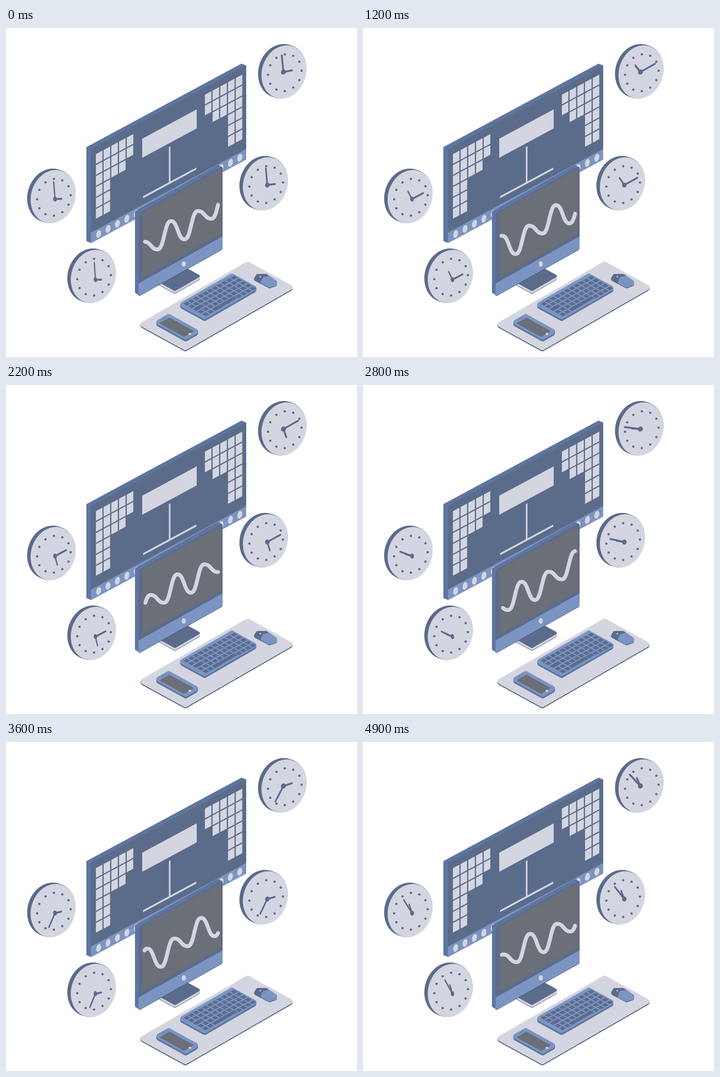
Recreate the animation shown at these times as an HTML page with a canvas. Size 773 by 725 pixels, loop 5 s.

```html
<!DOCTYPE html>
<html lang="en">
<head>
<meta charset="utf-8">
<title>Isometric desk</title>
<style>
html, body { margin: 0; width: 100%; height: 100%; overflow: hidden; background: #fff; }
canvas { display: block; }
</style>
</head>
<body>
<canvas id="stage" width="773" height="725"></canvas>
<script>
const LIGHT = '#d3d5e0', DARK = '#5b6c8b', EDGE = '#5f75a0', BLUE = '#7b94c2';
const GREY = '#6a6f78', NAVY = '#414f6e';
const W = 773, H = 725, LOOP = 5000, STEP = 100;
const TURN = Math.PI * 2;

const view = document.getElementById('stage').getContext('2d');
const scene = document.createElement('canvas');
scene.width = W;
scene.height = H;
let g = scene.getContext('2d');

// Rectangles in the two isometric planes, as corner lists
const quad = (x, y, ux, uy, vx, vy) =>
  [[x, y], [x + ux, y + uy], [x + ux + vx, y + uy + vy], [x + vx, y + vy]];
const wall = (x, y, w, h, slope = .539) => quad(x, y, w, -w * slope, 0, h);
const floor = (x, y, a, b) => quad(x, y, a, -a * .577, b, b * .55);
const move = (pts, dx, dy) => pts.map(([x, y]) => [x + dx, y + dy]);

function poly(color, pts, r = 0) {
  const [a, b] = [pts[pts.length - 1], pts[0]];
  g.beginPath();
  g.moveTo((a[0] + b[0]) / 2, (a[1] + b[1]) / 2);
  pts.forEach((p, i) => g.arcTo(...p, ...pts[(i + 1) % pts.length], r));
  g.closePath();
  g.fillStyle = color;
  g.fill();
}

// A face with its side swept along (dx, dy)
function solid(top, side, face, dx, dy, r = 0) {
  const n = Math.ceil(Math.max(Math.abs(dx), Math.abs(dy)));
  for (let i = n; i > 0; i--) poly(side, move(face, dx * i / n, dy * i / n), r);
  poly(top, face, r);
}

// An ellipse sheared upwards to the right
function disc(color, x, y, rx, ry = rx, lift = 0) {
  g.save();
  g.transform(rx, -lift, 0, ry, x, y);
  g.beginPath();
  g.arc(0, 0, 1, 0, TURN);
  g.restore();
  g.fillStyle = color;
  g.fill();
}

function tiles(x, y, rowsIn) {
  for (let c = 0; c < 5; c++) {
    for (let r = 0; r < rowsIn(c); r++) {
      poly(LIGHT, wall(x + c * 17, y - c * 9.15 + r * 24.2, 14.3, 21.3));
    }
  }
}

function wideMonitor() {
  solid(DARK, EDGE, wall(187, 266.5, 342, 207.5), -10, -4);
  poly(BLUE, wall(187, 451, 342, 23));
  for (let i = 0; i < 16; i++) {
    if (i < 5 || i > 12) disc(LIGHT, 204 + i * 20.73, 454 - i * 11.2, 5.5, 8.2, 2.5);
  }
  tiles(198, 278, c => c < 2 ? 6 : c < 4 ? 3 : 2);
  tiles(438, 147, c => c > 2 ? 6 : c > 0 ? 3 : 2);
  poly(LIGHT, wall(300, 244, 120, 42));
  poly(LIGHT, wall(358.7, 262.5, 3.5, 80));
  poly(LIGHT, wall(302, 370.5, 117, 4.5));
}

function deskMonitor() {
  const slope = .562;
  const foot = floor(331, 557.5, 58, 41);
  poly(NAVY, move(foot, 0, 6), 3);
  solid(DARK, LIGHT, foot, 0, 5, 3);
  const front = wall(292, 408, 185, 183, slope);
  poly(NAVY, move(front, -1, 1.5), 3);
  solid(DARK, EDGE, front, -8, -4, 3);
  poly(GREY, wall(300, 407, 174, 143, .555));
  poly(BLUE, wall(292, 563, 185, 28, slope));
  disc(LIGHT, 391.5, 520, 4.5, 6);
}

function keyboard() {
  solid(BLUE, EDGE, floor(377.5, 609.5, 120, 60), 0, 4, 6);
  const pitch = 10.4, size = 7.6;
  const key = (row, col, span = 1) => poly(DARK, floor(
    390.5 + (row + col) * pitch,
    607.7 + (row * .56 - col * .55) * pitch,
    size + (span - 1) * pitch, size));
  for (let row = 0; row < 5; row++) {
    for (let col = 0; col < 11; col++) {
      const span = row === 4 && col === 2 ? 5 : row === 2 && col === 0 ? 2 : 1;
      key(row, col, span);
      col += span - 1;
    }
  }
}

function phone() {
  solid(BLUE, EDGE, floor(325, 648.5, 33, 71), 0, 4, 6);
  poly(GREY, floor(338, 651, 22, 54), 1);
  disc(LIGHT, 405, 674, 2.7, 2.5);
  for (let i = 0; i < 3; i++) disc(DARK, 345 + i * 3.5, 642 - i * 2, 1.2, .9);
}

function mouse() {
  poly(DARK, [[544, 555], [552, 542], [574, 542], [597, 558], [597, 568], [580, 574]], 5);
  poly(BLUE, [[560, 562], [566, 549], [580, 546], [597, 558], [597, 567], [579, 572]], 4);
  disc(LIGHT, 560, 548, 1.8, 1.6);
}

// Dial centre and the offset of its hub
const clocks = [
  { x: 614, y: 98.5, dx: -3, dy: -1.5 },
  { x: 105.5, y: 373, dx: 2.5, dy: 4 },
  { x: 573, y: 345, dx: 2.5, dy: 1 },
  { x: 194, y: 549, dx: 3, dy: 5.5 }
];

function dial({ x, y }) {
  for (let i = 0; i <= 6; i++) disc(DARK, x - 8.7 + i, y - 4.2 + i * .35, 50.3, 58.6, 7);
  disc(LIGHT, x - 1.8, y - 1.6, 49.5, 58.2, 7);
  for (let i = 0; i < 12; i++) {
    const a = i * TURN / 12, c = Math.cos(a), s = Math.sin(a);
    disc(DARK, x + 37 * s, y - 40.5 * c - 4.5 * s, 2.5);
  }
}

function hands({ x, y, dx, dy }, frame) {
  const reach = 37;
  const hand = (deg, len) => {
    const a = deg * TURN / 360;
    g.beginPath();
    g.moveTo(0, 0);
    g.lineTo(Math.sin(a) * len, -Math.cos(a) * len);
    g.stroke();
  };
  g.save();
  // The lower the hub sits, the more the hands turn away from the viewer
  g.transform((33 - 1.5 * dy) / reach, (dy - 2) / reach, 0, 1, x + dx, y + dy);
  g.strokeStyle = DARK;
  g.lineWidth = 4.1;
  hand(-6 + 36 * frame, reach);
  hand(85 + 19.8 * frame, 20);
  disc(DARK, 0, 0, 5.8, 5.6);
  g.restore();
}

// Alternating crests and troughs, a quarter span apart, along a rising line
const SPAN = 118.5, RISE = .57;

function turning(n, head) {
  const x = head + n * SPAN / 4;
  const tilt = (n % 4 + 4) % 4 < 2 ? 5.8 : -5.8;
  return { x, y: 489 + 22.7 * Math.cos(n * Math.PI) + tilt - RISE * (x - 302) };
}

function waveY(x, head) {
  const n = Math.floor((x - head) / (SPAN / 4));
  const a = turning(n, head), b = turning(n + 1, head);
  const f = (x - a.x) / (b.x - a.x);
  const ease = f * f / (f * f + (1 - f) * (1 - f));
  return a.y + (b.y - a.y) * ease;
}

function wave(frame) {
  const head = 393 - frame * SPAN / 25;
  let x0 = 306;
  for (let i = 0; i < 6; i++) x0 = 304.5 + .1 * (waveY(x0, head) - 455);
  g.beginPath();
  for (let i = 0; i <= 200; i++) {
    const x = x0 + (467 - x0) * i / 200;
    g.lineTo(x, waveY(x, head));
  }
  g.strokeStyle = LIGHT;
  g.lineWidth = 8.5;
  g.lineCap = g.lineJoin = 'round';
  g.stroke();
}

function paintScene() {
  g.fillStyle = '#fff';
  g.fillRect(0, 0, W, H);
  wideMonitor();
  deskMonitor();
  solid(LIGHT, NAVY, floor(290, 653.5, 242, 105), 0, 2, 6);
  keyboard();
  phone();
  mouse();
  clocks.forEach(dial);
}

paintScene();
g = view;
const start = performance.now();

function draw(now) {
  const frame = Math.floor(Math.max(0, now - start) % LOOP / STEP);
  g.drawImage(scene, 0, 0);
  wave(frame);
  clocks.forEach(c => hands(c, frame));
  requestAnimationFrame(draw);
}
draw(start);
</script>
</body>
</html>
```
